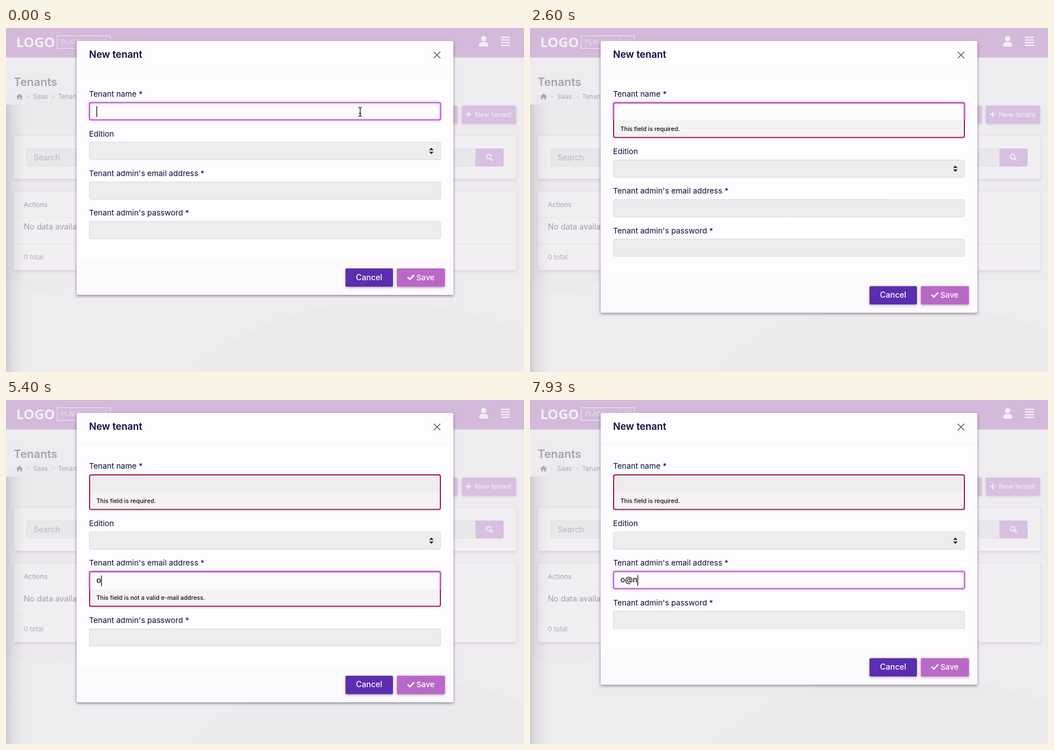
These frames come from a looping animation (917 by 611 pixels, 8000 ms). An HTML page with a canvas:

```html
<!DOCTYPE html>
<html lang="en">
<head>
<meta charset="utf-8">
<title>New tenant</title>
<style>
html, body { margin: 0; width: 100%; height: 100%; overflow: hidden; background: #edebee; }
canvas { display: block; width: 917px; height: 611px; }
</style>
</head>
<body>
<canvas id="stage"></canvas>
<script>
const W = 917, H = 611, LOOP = 8000;
const canvas = document.getElementById('stage');
const ctx = canvas.getContext('2d');
const dpr = window.devicePixelRatio || 1;
canvas.width = Math.round(W * dpr);
canvas.height = Math.round(H * dpr);

const SANS = 'Inter, "Open Sans", sans-serif';
const INK = '#0d0a3d', PURPLE = '#b55fc6', PALE = '#e2bfe9', RED = '#a51c4b';
const LIGHT = [253, 251, 254], GRAY = [238, 236, 238];
const NAME = 'Mubo', MAIL = 'o@n';
const ROW = 70.3, INPUT_H = 31.6, ERROR_H = 31.4;

// Moments of the story, in ms
const nameKeys = [470, 600, 740, 870];
const nameErase = [2270, 2340, 2400, 2530];
const mailKeys = [5330, 7330, 7730];
const NAME_ERR = 2530, TAB_1 = 3870, TAB_2 = 4730, BLINK = 530;

const clamp = v => Math.max(0, Math.min(1, v));
const ease = v => { v = clamp(v); return v * v * (3 - 2 * v); };
const ramp = (t, from, len = 150) => ease((t - from) / len);
const passed = (list, t) => list.filter(k => t >= k).length;
const mix = (a, b, k) => `rgb(${a.map((v, i) => Math.round(v + (b[i] - v) * k))})`;

function text(str, x, y, size, color, weight = 400) {
  ctx.font = `${weight} ${size}px ${SANS}`;
  ctx.fillStyle = color;
  ctx.fillText(str, x, y);
}

// Narrow face, with a smaller size if it runs too wide
function narrow(str, x, midY, size, room, color, weight) {
  ctx.save();
  ctx.fontStretch = 'condensed';
  const face = s => `${weight} ${s}px "Open Sans", "Noto Sans", sans-serif`;
  ctx.font = face(size);
  while (size > 8 && ctx.measureText(str).width > room) ctx.font = face(size -= 0.5);
  ctx.fillStyle = color;
  ctx.fillText(str, x, midY + size * 0.357);
  ctx.restore();
}

function rect(x, y, w, h, color, r = 0) {
  ctx.beginPath();
  ctx.roundRect(x, y, w, h, r);
  ctx.fillStyle = color;
  ctx.fill();
}

function outline(x, y, w, h, color, line, r) {
  ctx.beginPath();
  ctx.roundRect(x + line / 2, y + line / 2, w - line, h - line, r);
  ctx.strokeStyle = color;
  ctx.lineWidth = line;
  ctx.stroke();
}

function path(points, color, width) {
  ctx.beginPath();
  points.forEach(([x, y], i) => i ? ctx.lineTo(x, y) : ctx.moveTo(x, y));
  ctx.strokeStyle = color;
  ctx.lineWidth = width;
  ctx.stroke();
}

function poly(points, color) {
  ctx.beginPath();
  points.forEach(([x, y]) => ctx.lineTo(x, y));
  ctx.fillStyle = color;
  ctx.fill();
}

function shadow(color, blur, dy, draw) {
  ctx.save();
  ctx.shadowColor = color;
  ctx.shadowBlur = blur * dpr;
  ctx.shadowOffsetY = dy * dpr;
  draw();
  ctx.restore();
}

function backdrop() {
  rect(0, 0, W, H, '#eeecef');
  ctx.fillStyle = 'rgba(90,70,100,.012)';
  ctx.beginPath();
  ctx.ellipse(60, 290, 150, 178, 0, 0, 7);
  ctx.fill();
  ctx.beginPath();
  ctx.moveTo(330, 611);
  ctx.bezierCurveTo(470, 480, 690, 450, 917, 540);
  ctx.lineTo(917, 611);
  ctx.fill();
}

function header() {
  const white = '#f3eef5';
  rect(0, 0, W, 52.5, '#d3bada');
  narrow('LOGO', 18, 25, 33.5, 69, white, 700);
  outline(90, 13, 95.5, 24, '#e9deed', 1.3, 0);
  narrow('PLACEHOLDER', 97, 25, 17, 84, '#e9deed', 400);

  ctx.fillStyle = white;
  ctx.beginPath();
  ctx.arc(845.5, 19, 4.7, 0, 7);
  ctx.fill();
  rect(837.5, 25, 16, 8, white, [5, 5, 2, 2]);
  for (let i = 0; i < 4; i++) rect(876, 15.3 + i * 4.8, 16, 2.3, white);
}

function card(y, h) {
  shadow('rgba(60,40,70,.13)', 6, 2, () => rect(14, y, 889, h, '#f1eff2', 2));
}

function pageButton(x, y, w, h = 32) {
  shadow('rgba(80,40,90,.18)', 4, 1, () => rect(x, y, w, h, '#d8c0e0', 2));
}

function page() {
  const gray = '#aaa7ad', pale = '#f4eff6';
  backdrop();
  header();
  text('Tenants', 13.5, 103, 20, '#a7a4aa', 600);

  poly([[24, 116.5], [30, 122], [28.3, 122], [28.3, 127], [25.4, 127], [25.4, 123.5],
        [22.6, 123.5], [22.6, 127], [19.7, 127], [19.7, 122], [18, 122]], gray);
  text('·', 37, 126, 11.4, gray, 600);
  text('Saas', 48, 126, 11.4, '#b0adb3');
  text('·', 82, 126, 11.4, gray, 600);
  text('Tenants', 92, 126, 11.4, '#b0adb3');

  pageButton(700, 138, 99.5);
  pageButton(807, 138, 96);
  path([[814, 153.5], [824, 153.5]], pale, 2);
  path([[819, 148.5], [819, 158.5]], pale, 2);
  text('New tenant', 830, 158, 12.1, pale);

  card(192, 76);
  rect(36, 214, 796, 32, '#e9e7ea', 2);
  outline(36, 214, 796, 32, '#e4e1e5', 1, 2);
  text('Search', 49, 235, 14, '#bbb8be');
  rect(831, 214, 50, 32, '#d8c0e0', 2);
  ctx.beginPath();
  ctx.arc(854.5, 228.5, 4, 0, 7);
  ctx.strokeStyle = pale;
  ctx.lineWidth = 2;
  ctx.stroke();
  path([[857.5, 231.5], [861.5, 235.5]], pale, 2.4);

  card(291, 139);
  text('Actions', 31.5, 318, 11.8, '#a5a2a8');
  rect(14, 336, 889, 1, '#e9e7ea');
  text('No data available', 31.5, 358, 14, '#a3a0a6');
  rect(14, 383, 889, 1, '#e5e2e6');
  text('0 total', 31.5, 411, 11.8, '#b2afb5');

  const side = ctx.createLinearGradient(0, 0, 34, 0);
  side.addColorStop(0, 'rgba(60,55,65,.17)');
  side.addColorStop(0.35, 'rgba(60,55,65,.07)');
  side.addColorStop(1, 'rgba(60,55,65,0)');
  shadow('rgba(60,55,65,.05)', 20, 0, () => { rect(0, 136, 34, H, side); });
}

// focus: 0..1, red: how far the focus ring has turned into the error ring
function field(label, y, { focus = 0, ring = PURPLE, error = '', red = 0, value = '', caret = false, select = false }) {
  const x = 147, w = 623, mid = y + INPUT_H / 2;
  const full = INPUT_H + (error ? ERROR_H : 0);
  text(label, x, y - 10, 13.75, INK);
  if (error) rect(x, y, w, full, '#f4f2f4', 3);
  rect(x, y, w, INPUT_H, mix(GRAY, LIGHT, focus), error ? [3, 3, 0, 0] : 3);

  if (error) outline(x, y - 0.3, w, full + 0.6, RED, 2, 3);
  else outline(x + 0.3, y, w - 0.6, INPUT_H, '#dcdadd', 1, 3);

  const glow = focus * (error ? 1 - red : 1);
  if (glow > 0) {
    ctx.save();
    if (error) {
      ctx.beginPath();
      ctx.rect(x - 8, y - 8, w + 16, INPUT_H + 8);
      ctx.clip();
    }
    ctx.globalAlpha = glow;
    shadow('rgba(186,104,200,.55)', 4, 0, () =>
      outline(x - 0.3, y - 0.8, w + 0.6, full + 1.2, ring, select ? 2.4 : 2, 3));
    ctx.restore();
  }
  if (select) {
    poly([[749, mid - 1.4], [753, mid - 5.6], [757, mid - 1.4]], '#262328');
    poly([[749, mid + 1.4], [753, mid + 5.6], [757, mid + 1.4]], '#262328');
  }
  const drop = error ? 0.8 : 0;
  text(value, 160, mid + 4.3 + drop, 13.75, '#111', 500);
  if (caret) rect(160 + ctx.measureText(value).width, mid - 9.2 + drop, 1.3, 19, '#111');
  if (error) text(error, 160, y + 50.3, 10.5, '#131016', 500);
  return y + ROW + (error ? ERROR_H : 0);
}

function button(x, y, w, color) {
  shadow('rgba(40,10,60,.35)', 4, 1.5, () => rect(x, y, w, 32.6, color, 2));
}

function pointer(x, y) {
  const bar = (color, width) => {
    path([[x - 3, y - 8], [x - 1, y - 7.5], [x, y - 6], [x, y + 6], [x - 1, y + 7.5], [x - 3, y + 8]], color, width);
    path([[x + 3, y - 8], [x + 1, y - 7.5], [x, y - 6]], color, width);
    path([[x, y + 6], [x + 1, y + 7.5], [x + 3, y + 8]], color, width);
    path([[x - 2, y + 2.5], [x + 2, y + 2.5]], color, width);
  };
  bar('#fff', 3);
  bar('#1a1a1a', 1.3);
}

function caretOn(t, since) {
  return t >= since && Math.floor((t - since) / BLINK) % 2 === 0;
}

function lastKey(keys, t, start) {
  return keys.reduce((best, k) => t >= k ? k : best, start);
}

function modal(t) {
  const nameError = t >= NAME_ERR ? 'This field is required.' : '';
  const mailError = t >= mailKeys[0] && t < mailKeys[2] ? 'This field is not a valid e-mail address.' : '';
  const bottom = 474 + ERROR_H * (!!nameError + !!mailError);

  shadow('rgba(30,20,40,.5)', 5, 2, () => rect(125, 23, 667, bottom - 23, '#fefcff', 2));
  rect(125, 78, 667, 1, '#f4f2f5');
  rect(125, bottom - 61.5, 667, 61.5, '#fdfafd', [0, 0, 2, 2]);
  text('New tenant', 147, 53, 17.1, INK, 600);
  path([[757.2, 42.2], [768.8, 53.8]], '#555258', 1.3);
  path([[768.8, 42.2], [757.2, 53.8]], '#555258', 1.3);

  const typed = passed(nameKeys, t) - passed(nameErase, t);
  const nameSince = t < nameErase[0] ? lastKey(nameKeys, t, 0)
    : t < NAME_ERR ? lastKey(nameErase, t, 0) : NAME_ERR + BLINK;
  let y = field('Tenant name *', 132.3, {
    focus: 1 - ramp(t, TAB_1, 120),
    error: nameError,
    red: ramp(t, NAME_ERR + 60),
    value: NAME.slice(0, typed),
    caret: t < TAB_1 && caretOn(t, nameSince)
  });

  y = field('Edition', y, {
    focus: ramp(t, TAB_1, 120) * (1 - ramp(t, TAB_2)),
    ring: PALE,
    select: true
  });

  y = field("Tenant admin's email address *", y, {
    focus: ramp(t, TAB_2),
    error: mailError,
    red: ramp(t, mailKeys[0] + 60),
    value: MAIL.slice(0, passed(mailKeys, t)),
    caret: caretOn(t, lastKey(mailKeys, t, TAB_2))
  });

  field("Tenant admin's password *", y, {});

  const by = bottom - 47;
  button(601, by, 84, '#5a2eae');
  text('Cancel', 619.5, by + 20.5, 14, '#fff', 500);
  button(692, by, 85, '#ba68c8');
  path([[711, by + 15.5], [715, by + 19.5], [722.5, by + 11.5]], '#fff', 2.6);
  text('Save', 726.5, by + 20.5, 13.7, '#fff', 500);

  if (t < nameKeys[0]) pointer(627, 149);
}

function frame(now) {
  ctx.setTransform(dpr, 0, 0, dpr, 0, 0);
  page();
  modal(now % LOOP);
}

const start = performance.now();
function tick() {
  frame(performance.now() - start);
  requestAnimationFrame(tick);
}
tick();
</script>
</body>
</html>
```
